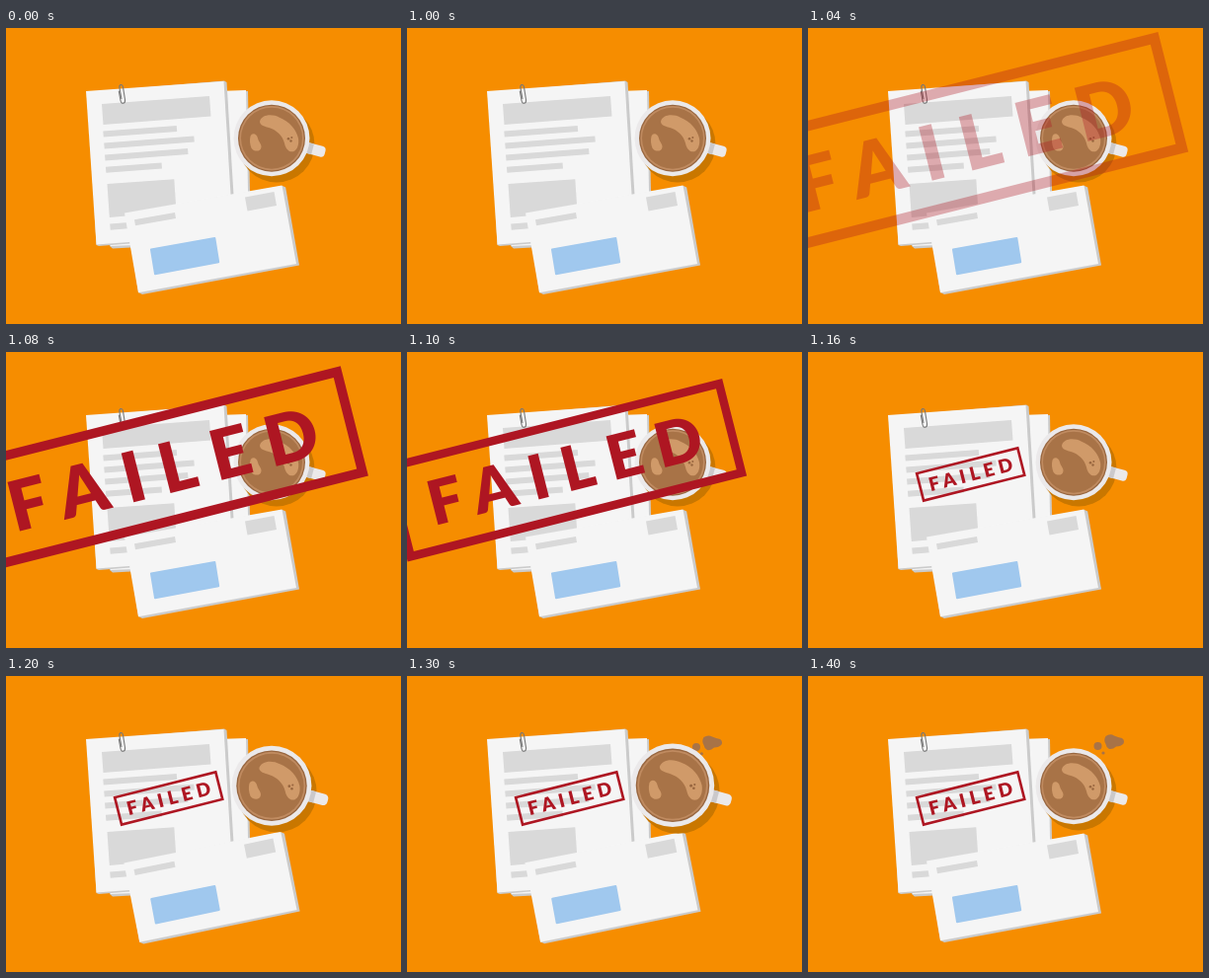
Recreate the animation shown at these times as an HTML page. Size 400 by 300 pixels, loop 2400 ms.

```html
<!DOCTYPE html>
<html lang="en">
<head>
<meta charset="utf-8">
<title>Failed stamp</title>
<style>
html, body { margin: 0; width: 100%; height: 100%; overflow: hidden; background: #f68d00; }
svg { display: block; width: 100%; height: 100%; }
.paper { fill: #f5f5f5; }
.edge { fill: #cbcbcb; }
.ink { fill: #d9d9d9; }
.drops { fill: #a87347; }
#stamp rect { fill: none; stroke: #ae1622; stroke-width: 2.6; }
#stamp text { font: 900 19px Lato, "Open Sans", sans-serif; letter-spacing: 4.5px; fill: #ae1622; text-anchor: middle; }
</style>
</head>
<body>
<svg viewBox="0 0 400 300">
  <!-- back sheet -->
  <path class="edge" d="M102 69L245 64L248 216L108 223.5L105 221Z"/>
  <path class="paper" d="M100 68L243 63L246 215L106 221Z"/>

  <!-- front sheet -->
  <path class="edge" d="M83 65L221 53.5L223.5 55L233 210L94 221L91.500 220Z"/>
  <path class="paper" d="M81 64L220.500 54L230 209L91.500 219.500Z"/>
  <g class="ink">
    <path d="M97 77L206 69L207.500 89.500L98.500 98Z"/>
    <path d="M98.300 104.500L172.700 99L173.200 105L98.800 110.500Z"/>
    <path d="M99.200 116.500L190.300 109.500L190.800 115.500L99.700 122.500Z"/>
    <path d="M100 128.500L184 122L184.500 128L100.500 134.500Z"/>
    <path d="M100.900 140.700L157.500 136.400L158 142.400L101.400 146.700Z"/>
    <path d="M102.500 158L170.300 153.300L172.500 186L104.800 192Z"/>
    <path d="M105.200 198.500L150 195L150.500 201L105.700 204.700Z"/>
  </g>
  <path d="M114.300 64L116 73.500Q116.700 76.700 118.800 76.200Q121 75.600 120.500 72.500L118.500 60Q118 57.200 116.200 57.500Q114.500 58 115 61L116.900 71.500"
    fill="none" stroke="#777" stroke-width="1.100" stroke-linecap="round"/>

  <g id="envelope">
    <path class="edge" d="M122 188L280 160L283.200 161.500L297 240.500L138 270L134 268Z"/>
    <path class="paper" d="M120 187.500L279.500 159.500L294 239L134 268.200Z"/>
    <path class="ink" d="M130 194.300L171 187L172 193L131 200.300Z"/>
    <path class="ink" d="M242 171.500L271.500 166L274 180L244.500 185.500Z"/>
    <path d="M147 224.600L211.300 213L215.200 237.200L151 249.200Z" fill="#a0c8ee" stroke="#a0c8ee" stroke-width="2" stroke-linejoin="round"/>
  </g>

  <g class="drops">
    <path id="blob" d="M-8.500 -6Q-4 -9 0 -6.500Q4 -5 8 -4Q11 -2 9.500 1.500Q7 4.500 2 4.500Q-1 7.500 -5 7Q-8 5.500 -8.500 2Q-11 -2 -8.500 -6Z"/>
    <circle id="dot" r="4"/>
    <circle id="speck" r="1.600"/>
  </g>

  <!-- cup, drawn around its centre -->
  <g id="cup">
    <circle cx="5" cy="6.300" r="38.500" fill="#c97700"/>
    <g transform="rotate(15)">
      <rect x="30" y="-5.500" width="26" height="11" rx="4" fill="#ebe9ea"/>
      <rect x="30" y="-5.500" width="13" height="11" fill="#cbc9cb"/>
    </g>
    <circle r="38.500" fill="#ebe9ea"/>
    <circle r="34" fill="#98663f"/>
    <circle r="32.700" fill="#c08b60"/>
    <circle r="31" fill="#a87347"/>
    <g fill="#d09a69">
      <path d="M-12 -17C-10 -24 0 -25 8 -21C18 -17 25 -9 27 0C28 6 26 12 22 13.500C17 14.500 14 10 13 5C11 -3 5 -8 -2 -10.500C-7 -12 -12 -13 -12 -17Z"/>
      <path d="M-21.500 -2C-20 -6 -15 -5 -14 0C-13 4 -10 6 -10.500 9C-11 14 -18 14 -20.500 10C-22 6 -22.500 2 -21.500 -2Z"/>
    </g>
    <g fill="#98663f">
      <circle cx="17" cy="0.500" r="1.300"/>
      <circle cx="20.300" cy="-0.600" r="1"/>
      <circle cx="19.500" cy="2.800" r="1.200"/>
    </g>
  </g>

  <g id="stamp">
    <rect x="-52.700" y="-14.200" width="105.400" height="28.400"/>
    <text x="2.200" y="6.800">FAILED</text>
  </g>
</svg>
<script>
const LOOP = 2400, START = 1000, STEP = 20, STEPS = 20;
const el = id => document.getElementById(id);
const set = (id, value) => el(id).setAttribute("transform", value);
const span = (k, a, b) => Math.min(1, Math.max(0, (k - a) / (b - a)));
const bump = u => Math.sin(Math.PI * u);

// resting places of the spilled coffee
const drops = [["blob", 310, 67], ["dot", 293.5, 71], ["speck", 299, 78]];
const spill = { x: 275, y: 105 };

function draw(t) {
  const k = Math.min(STEPS, Math.max(0, Math.floor((t - START) / STEP + 1e-6)));

  const s = 4.04 - 3.04 * span(k, 2, 8) ** 2;
  set("stamp", `translate(${166.8 - 2.1 * s} ${125.9 - 1.9 * s}) rotate(-14.2) scale(${s})`);
  el("stamp").setAttribute("opacity", span(k, 1, 4));

  const shake = span(k, 8, 20);
  set("cup", `translate(269 ${111.7 - bump(shake)}) scale(${1 + 0.1 * bump(shake)})`);
  set("envelope", `rotate(${-1.5 * bump(shake ** 0.6)} 207 214)`);

  const out = 1 - (1 - span(k, 10, 16)) ** 2;
  for (const [id, x, y] of drops) {
    set(id, `translate(${spill.x + (x - spill.x) * out} ${spill.y + (y - spill.y) * out})`);
  }
}

const begin = performance.now();
function tick() {
  draw((performance.now() - begin) % LOOP);
  requestAnimationFrame(tick);
}
tick();
</script>
</body>
</html>
```
